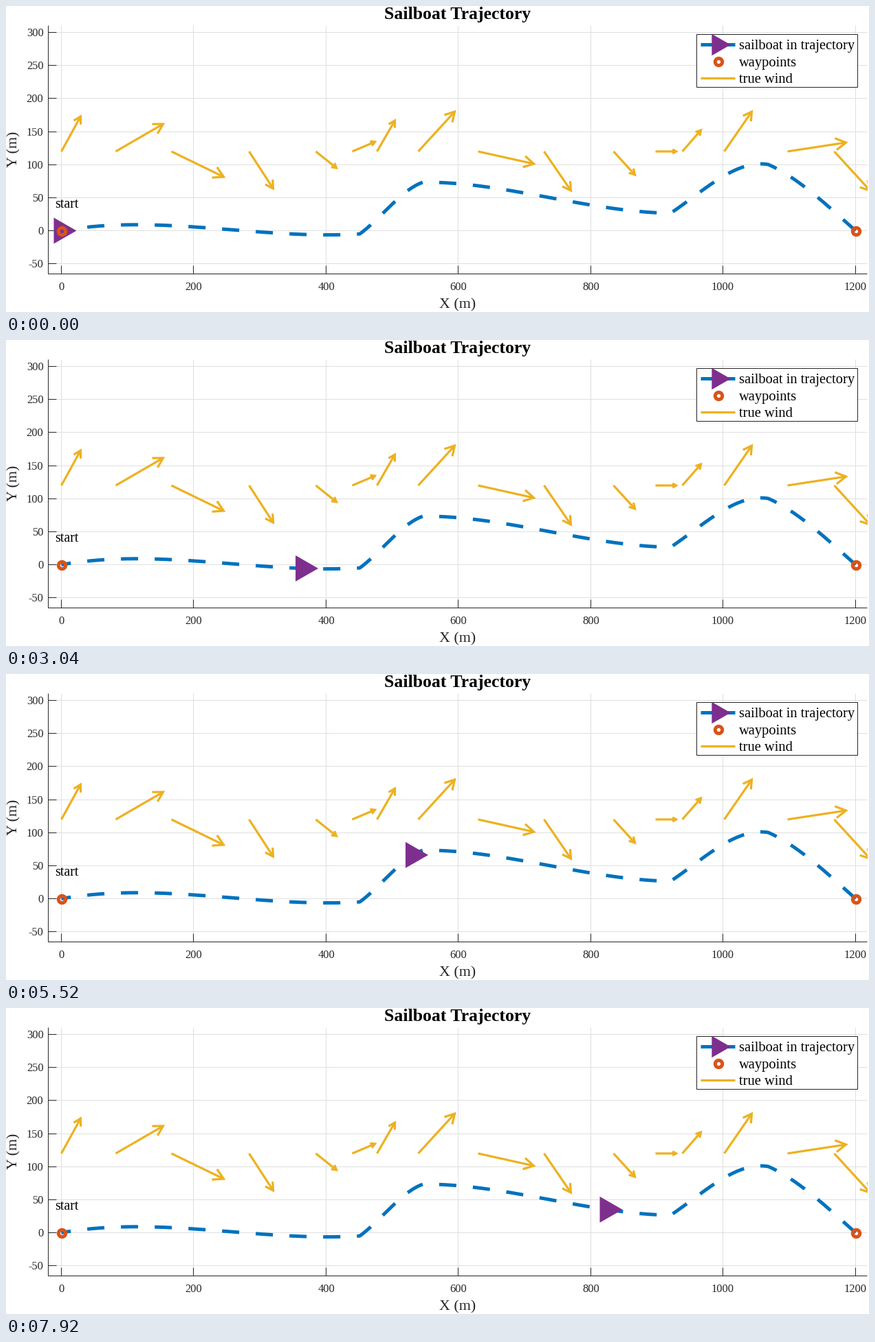
A matplotlib script that plays this animation: 1255 by 446 pixels, repeating every 8 s.

```python
import numpy as np
import matplotlib.pyplot as plt
from matplotlib.animation import FuncAnimation
from matplotlib.patches import Polygon, Rectangle

W, H, DPI = 1255, 446, 100
PT = 72 / DPI
FRAMES, STEP_MS = 100, 80
BLUE, ORANGE, GOLD, PURPLE = "#0072BD", "#D95319", "#EDB120", "#7E2F8E"
INK, GRID = "#262626", "#DFDFDF"
LEFT, RIGHT, TOP, BOTTOM = 61, 1252, 28, 390

plt.rcParams["font.family"] = "Liberation Serif"
fig = plt.figure(figsize=(W / DPI, H / DPI), dpi=DPI, facecolor="white")
ax = fig.add_axes([0, 0, 1, 1])
# Whole numbers fall on pixel centres
ax.set_xlim(-0.5, W - 0.5)
ax.set_ylim(H - 0.5, -0.5)
ax.axis("off")


def px(metres):
    return round(79.9 + 0.9625 * metres)


def py(metres):
    return round(327 - 0.9625 * metres)


def line(xs, ys, color, width, z=2, **kw):
    return ax.plot(xs, ys, color=color, lw=width * PT, zorder=z, snap=False,
                   solid_capstyle="butt", solid_joinstyle="miter", **kw)[0]


def text(x, y, s, size, color="black", ha="center", va="baseline", **kw):
    ax.text(x, y, s, fontsize=size * PT, color=color, ha=ha, va=va,
            zorder=12, **kw)


def ring(x, y, z=9):
    ax.plot([x], [y], "o", ms=10.4 * PT, mfc="none", mec=ORANGE,
            mew=5 * PT, zorder=z)


def boat_shape(x, y, size=1.0):
    back, nose, half = x - 11 * size, x + 22 * size, 19 * size
    return [(back, y - half), (nose, y), (back, y + half)]


# Each leg is a cubic: start point, then its bulge at the start and the end
LEGS = [(80, 327, -81, 32), (514, 331.7, 8, -45), (606, 256.3, -47, 40),
        (966, 301.5, -24, -95), (1108, 230.5, -41, -17), (1235, 327, 0, 0)]


def route_y(x):
    for (x0, y0, a, b), (x1, y1, *_) in zip(LEGS, LEGS[1:]):
        if x <= x1:
            break
    s = (x - x0) / (x1 - x0)
    return y0 + (y1 - y0) * s + s * (1 - s) * (a * (1 - s) + b * s)


# Boat position after every KEY steps, joined by a smooth cubic
KEY = 11
BOAT_X = np.array([80, 167, 262, 385, 477, 522, 570, 661, 760, 874])
SPEED = np.gradient(BOAT_X)


def boat_x(step):
    i = min(step // KEY, len(BOAT_X) - 2)
    s = step / KEY - i
    d = BOAT_X[i + 1] - BOAT_X[i]
    bend = (1 - s) * (SPEED[i] - d) + s * (d - SPEED[i + 1])
    return BOAT_X[i] + d * s + s * (1 - s) * bend


def wind_arrow(x, dx, dy, clip):
    tail, d, n = np.array([x, 211.5]), np.array([dx, dy]), np.array([-dy, dx])
    tip = tail + d
    barbs = [tip - 0.175 * d + side * 0.1 * n for side in (1, -1)]
    for pts in ([tail, tip], [barbs[0], tip, barbs[1]]):
        line(*np.transpose(pts), GOLD, 3.2, 6).set_clip_path(clip)


# Grid, axes and ticks
for v in range(0, 1201, 200):
    line([px(v)] * 2, [TOP, BOTTOM], GRID, 1, 1)
    line([px(v)] * 2, [BOTTOM, BOTTOM - 12], INK, 1, 3)
    text(px(v), 413, str(v), 16.5, INK)
for v in range(-50, 301, 50):
    line([LEFT, RIGHT], [py(v)] * 2, GRID, 1, 1)
    line([LEFT, LEFT + 12], [py(v)] * 2, INK, 1, 3)
    text(54, py(v) + 5.5, str(v), 16.5, INK, "right")
line([LEFT, LEFT, RIGHT], [TOP, BOTTOM, BOTTOM], INK, 1, 3)

text(656.5, 19, "Sailboat Trajectory", 25.8, weight="bold")
text(656, 440, "X (m)", 22, INK)
text(11, 208.5, "Y (m)", 22, INK, va="center", rotation=90)
text(88, 294, "start", 20)

# Dashed route; the pattern starts part way through a dash
xs = np.arange(80, 1236)
line(xs, [route_y(x) for x in xs], BLUE, 5, 4, dash_capstyle="butt",
     linestyle=(11.1 / 5, (25 / 5, 24.1 / 5)))
ring(80, 327)
ring(1235, 327)

# Wind samples: tail x, then the vector
plot_area = Rectangle((LEFT, TOP), RIGHT - LEFT, BOTTOM - TOP,
                      transform=ax.transData)
for sample in [(80, 28, -51), (159, 69, -40), (240, 76, 37), (353, 35, 54),
               (450, 30, 24), (503, 33, -14), (539, 26, -45), (599, 53, -58),
               (686, 81, 18), (782, 39, 57), (883, 31, 34), (944, 30, 0),
               (983, 27, -31), (1044, 40, -58), (1136, 85, -13),
               (1204, 52, 57)]:
    wind_arrow(*sample, plot_area)

# Legend
ax.add_patch(Rectangle((1004, 41), 234, 77, fc="white", ec=INK, lw=PT,
                       zorder=10, snap=False))
line([1010, 1060], [56, 56], BLUE, 5, 11)
ax.add_patch(Polygon(boat_shape(1035, 56, 0.83), fc=PURPLE, lw=0, zorder=12))
ring(1035, 80, 12)
line([1010, 1060], [105, 105], GOLD, 3.2, 11)
for row, label in enumerate(("sailboat in trajectory", "waypoints",
                             "true wind")):
    text(1065, 63 + 24.2 * row, label, 20.5, ha="left")

boat = ax.add_patch(Polygon(boat_shape(80, 327), fc=PURPLE, lw=0, zorder=8))


def update(step):
    x = boat_x(step)
    boat.set_xy(boat_shape(x, route_y(x)))
    return (boat,)


anim = FuncAnimation(fig, update, frames=FRAMES, interval=STEP_MS,
                     repeat=True, repeat_delay=0, blit=False)
plt.show()
```
